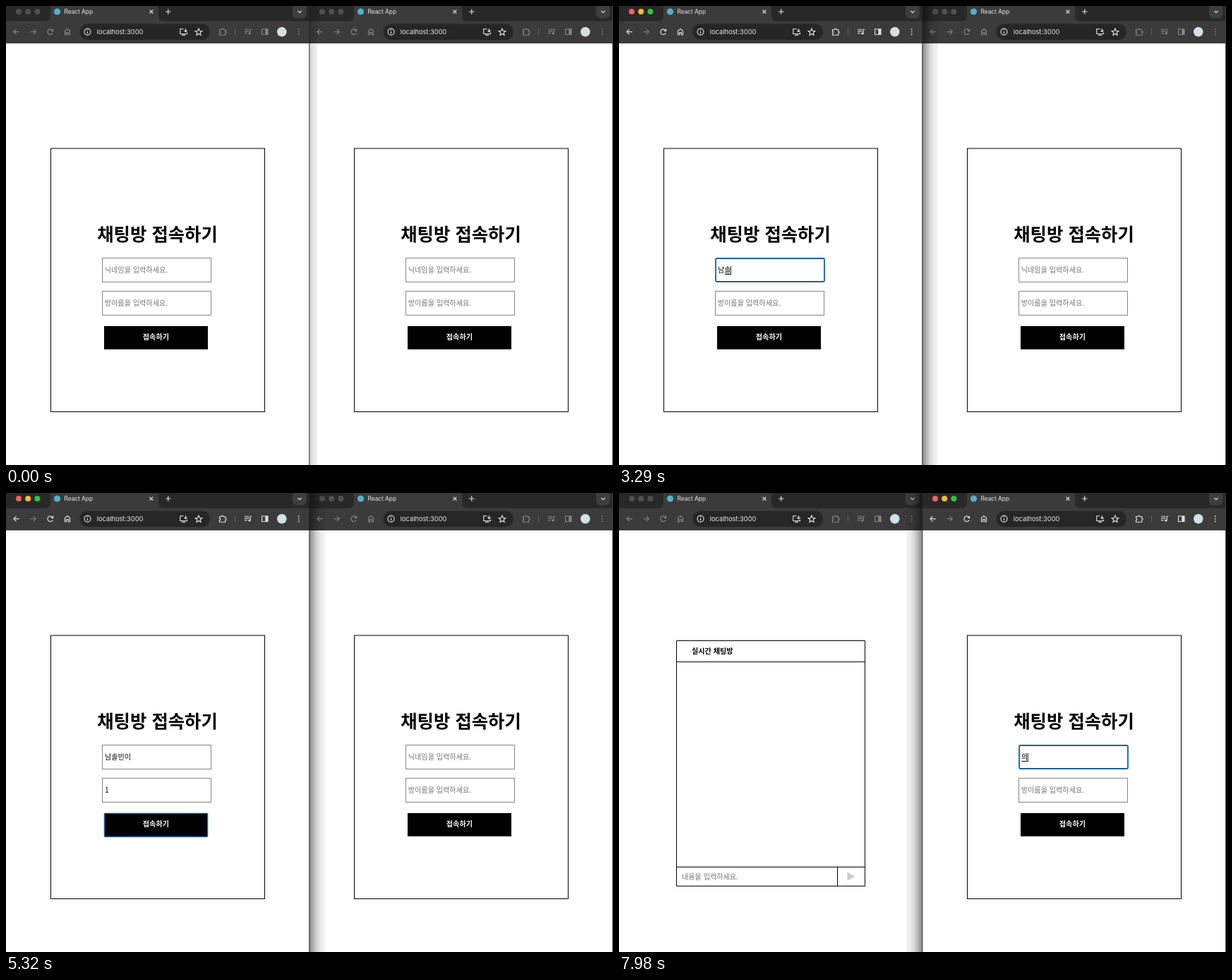
Recreate the animation shown at these times as an HTML page. Size 860 by 651 pixels, loop 8000 ms.

```html
<!DOCTYPE html>
<html lang="ko">
<head>
<meta charset="utf-8">
<title>Chat room</title>
<style>
  html, body { margin: 0; width: 100%; height: 100%; overflow: hidden; background: #fff; }
  svg { display: block; width: 860px; height: 651px; }
  text { font-family: 'Noto Sans CJK KR', 'Noto Sans CJK JP', 'Noto Sans CJK', sans-serif; font-size: 10.1px; }
  .ui { font-family: Inter, sans-serif; fill: #e8e8e8; }
  .hint { fill: #757575; }
  .b { font-weight: 700; }
  .line { fill: none; stroke: #000; }
  .icon { fill: none; stroke-width: 1.15; }
</style>
</head>
<body>
<svg id="stage" viewBox="0 0 860 651" lang="ko"></svg>
<script>
const LOOP = 8000, HALF = 430, CHAR = 9.3;
const stage = document.getElementById('stage');

// [time, text]: the last syllable is still being composed
const NICK = [
  [1330, 'ㄴ'], [1890, '나'], [2380, 'ㄴ'], [2730, '나'], [2870, '남'],
  [3080, '남ㅅ'], [3150, '남소'], [3290, '남솔'],
  [3500, '남솔ㅂ'], [3570, '남솔비'], [3640, '남솔빈'],
  [3850, '남솔빈ㅇ'], [3920, '남솔빈이']
];
const NICK2 = [[7910, 'ㅇ'], [7980, '의']];

const typed = (keys, t) => keys.reduce((s, [at, v]) => t >= at ? v : s, '');
const rect = (x, y, w, h, fill, extra = '') =>
  `<rect x="${x}" y="${y}" width="${w}" height="${h}" fill="${fill}" ${extra}/>`;
const dot = (x, y, r, fill) => `<circle cx="${x}" cy="${y}" r="${r}" fill="${fill}"/>`;
const text = (x, y, s, cls = '', extra = '') => `<text x="${x}" y="${y}" class="${cls}" ${extra}>${s}</text>`;
const icon = (d, color) => `<path class="icon" d="${d}" stroke="${color}"/>`;
const caret = (x, y) => rect(x, y, 0.8, 12, '#000');

function browser(active) {
  const c = active ? '#dedede' : '#858585', on = '#e3e3e3', dim = '#7c7c7c';
  const lights = active ? ['#fe5f57', '#febc2e', '#28c840'] : Array(3).fill('#505050');
  return rect(0, 0, 430, 53, '#282828') +
    '<path d="M56 21.500Q63 21.500 63 14V0H216V14Q216 21.500 223 21.500H430V53H0V21.500Z" fill="#3b3b3b"/>' +
    rect(0, 52, 430, 1, '#343434') +
    lights.map((f, i) => dot(18 + 13.2 * i, 8, 4, f)).join('') +
    dot(72.5, 8, 4.6, '#4fb3cc') +
    text(82.5, 11, 'React App', 'ui', 'style="font-size:8.3px"') +
    icon('M203.500 5.700l4.800 4.800m0-4.800l-4.800 4.800M226 8h7.500M229.750 4.250v7.500', on) +
    rect(406, -4, 19.5, 21.5, '#3e3e3e', 'rx="6"') + icon('M413.300 6.800l2.700 2.700l2.700-2.700', on) +
    // navigation
    icon('M18.800 36.600H11M14.600 32.900L10.900 36.600l3.700 3.700', c) +
    icon('M34.500 36.600h7.800M38.700 32.900l3.700 3.700l-3.700 3.700', dim) +
    icon('M66.200 38.200A3.800 3.800 0 1 1 65.300 33.900L66.500 35M66.600 32.500V35.300H63.800', c) +
    icon('M83.500 40.700V35.300L87 32.500l3.500 2.800V40.700H88.300V37.600H85.700V40.700Z', c) +
    // address bar
    rect(104.5, 25.5, 184.5, 22.5, '#262626', 'rx="11.2"') +
    icon('M111 36.600a4.500 4.500 0 1 0 9 0a4.500 4.500 0 1 0-9 0M115.500 36v3M115.500 33.900v1.100', on) +
    text(128.7, 40, 'localhost:3000', 'ui', 'style="font-size:9.3px"') +
    icon('M251.500 32.500H246.800V39.500H256.500V37.500M249 41.300h5.200M254.500 32v4.500M252.400 34.700l2.100 2.100l2.100-2.100', on) +
    icon('M273 32l1.400 3.200l3.500 .300l-2.700 2.300l.800 3.400L273 39.400l-3 1.800l.800-3.400l-2.700-2.300l3.500-.300Z', on) +
    // right-hand tools
    icon('M302.500 33.500h2.700a1.400 1.400 0 0 1 2.800 0h2.700v2.400a1.400 1.400 0 0 1 0 2.800v2.500h-8.200v-2.700a1.300 1.300 0 0 0 0-2.600Z', c) +
    rect(324, 32, 1, 9, '#646464') +
    icon('M338 33.200h6.500M338 35.900h6.500M338 38.600h3.600M348.300 33.200h-2.100v5.600', c) + dot(344.900, 39, 1.6, c) +
    icon('M362.600 32.700h8.400v7.800h-8.400Z', c) + rect(367.300, 32.500, 3.700, 8.200, c) +
    dot(390.800, 36.600, 6.800, '#d3e0e4') +
    [33, 36.600, 40.200].map(y => dot(414.700, y, 0.95, c)).join('');
}

function field(y, hint, value, focus, composing) {
  const end = 140 + (value === '1' ? 5.8 : CHAR * value.length);
  let s = focus
    ? rect(137, y + 0.5, 154, 33, '#fff', 'rx="1.500" stroke="#1660ac" stroke-width="1.800"')
    : rect(136.5, y, 154, 34, '#fff', 'stroke="#868686"');
  s += value ? text(140, y + 20.6, value) : text(139.8, y + 20.6, hint, 'hint');
  if (composing && value) s += rect(end - CHAR + 0.3, y + 22.5, CHAR - 0.3, 1, '#000');
  if (focus) s += caret(value ? end - 0.4 : 140.2, y + 11.5);
  return s;
}

function joinForm(nick, room, focus) {
  return '<rect class="line" x="63.500" y="202" width="303" height="373.500"/>' +
    text(214.5, 332.5, '채팅방 접속하기', 'b', 'text-anchor="middle" style="font-size:25.4px"') +
    field(357.5, '닉네임을 입력하세요.', nick, focus === 'nick', true) +
    field(404.5, '방이름을 입력하세요.', room, focus === 'room', false) +
    rect(139, 454, 147, 33, '#000') +
    (focus === 'join' ? rect(139.5, 454.5, 146, 33, 'none', 'rx="1" stroke="#1660ac" stroke-width="1.500"') : '') +
    text(212.4, 473.4, '접속하기', 'b', 'fill="#fff" text-anchor="middle"');
}

function chatRoom() {
  return '<path class="line" d="M81.500 209.500H348.500V557.500H81.500ZM81.500 239.500H348.500M81.500 530.500H348.500M309.500 530.500V557.500"/>' +
    text(103, 228, '실시간 채팅방', 'b') +
    text(89, 547.5, '내용을 입력하세요.', 'hint') +
    '<path d="M323.500 537.500L334.500 543.700L323.500 550Z" fill="#cbcbcb"/>';
}

function shadow(x, w, flip, stops) {
  const marks = stops.map(([o, a]) => `<stop offset="${o}" stop-opacity="${a}"/>`).join('');
  return `<linearGradient id="fade" x1="${flip ? 1 : 0}" x2="${flip ? 0 : 1}">${marks}</linearGradient>` +
    rect(x, 0, w, 651, 'url(#fade)');
}

function scene(t) {
  const active = t < 840 ? '' : t < 7140 ? 'left' : 'right';
  const focus = t < 840 ? '' : t < 4200 ? 'nick' : t < 5250 ? 'room' : 'join';
  const left = t < 5740 ? joinForm(typed(NICK, t), t < 4690 ? '' : '1', focus) : chatRoom();
  const right = joinForm(typed(NICK2, t), '', t < 7420 ? '' : 'nick');
  const deep = [[0, 0.46], [0.25, 0.3], [0.5, 0.16], [0.75, 0.075], [1, 0.045]];
  const shade = active === 'right' ? shadow(407, 22.5, true, deep)
    : active === 'left' ? shadow(430, 22, false, deep)
    : shadow(430, 11, false, [[0, 0.16], [1, 0.05]]);
  // text left of a composing syllable is already committed
  const plain = t >= 4200 ? left.replace(/<rect x="[^"]*" y="380"[^>]*>/, '') : left;
  return rect(0, 0, 860, 651, '#fff') +
    `<g>${browser(active === 'left')}${plain}</g>` +
    `<g transform="translate(${HALF})">${browser(active === 'right')}${right}</g>` +
    shade + rect(429.3, 0, 1, 651, '#222') + rect(859, 0, 1, 651, '#444');
}

let last = '';
function frame() {
  const next = scene(performance.now() % LOOP);
  if (next !== last) stage.innerHTML = last = next;
  requestAnimationFrame(frame);
}
frame();
</script>
</body>
</html>
```
